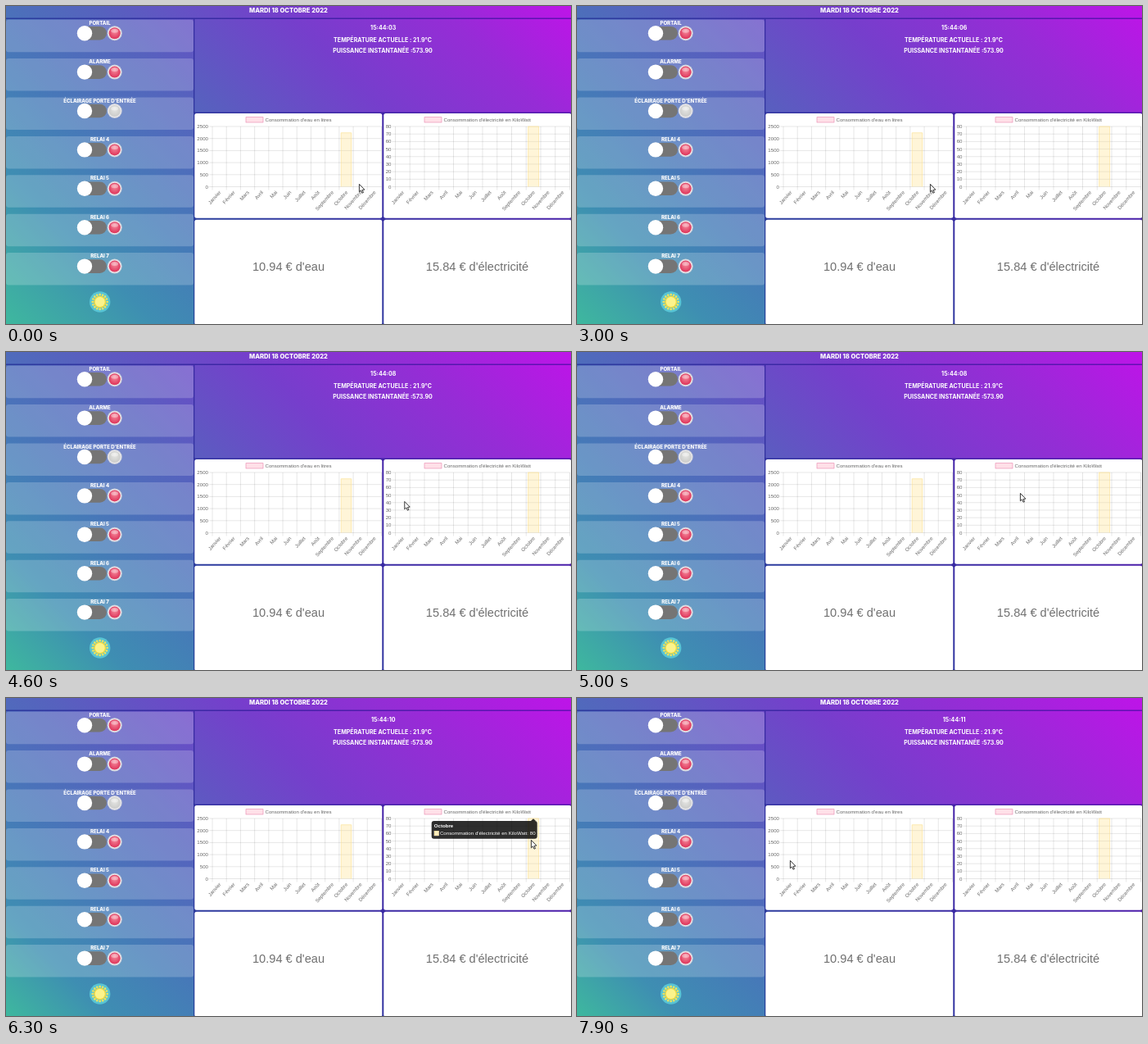
Write an HTML page with a canvas that moves like this. It is 690 by 388 pixels and loops after 8000 ms.

```html
<!DOCTYPE html>
<html lang="fr">
<head>
<meta charset="utf-8">
<style>
html, body { margin: 0; overflow: hidden; }
canvas { display: block; }
</style>
</head>
<body>
<canvas id="stage" width="690" height="388"></canvas>
<script>
const ctx = document.getElementById('stage').getContext('2d');
const LOOP = 8000, STEP = 100;
const SANS = '"Liberation Sans", Arial, sans-serif';
const INTER = 'Inter, sans-serif';
const MONTHS = ['Janvier', 'Février', 'Mars', 'Avril', 'Mai', 'Juin', 'Juillet',
  'Août', 'Septembre', 'Octobre', 'Novembre', 'Décembre'];
const RELAYS = ['PORTAIL', 'ALARME', "ÉCLAIRAGE PORTE D'ENTRÉE", 'RELAI 4', 'RELAI 5', 'RELAI 6', 'RELAI 7'];
const WATER = { name: "Consommation d'eau en litres", legend: 293, left: 252, right: 458.5, max: 2500, tick: 500, value: 2236.61 };
const POWER = { name: "Consommation d'électricité en KiloWatt", legend: 511, left: 475.5, right: 688.5, max: 80, tick: 10, value: 80 };
const TOP = 147, BASE = 220.5;

// time, x, y
const PATH = [
  [0, 431, 217], [3000, 431, 217], [3400, 410, 196], [4100, 410, 196],
  [5000, 541, 172], [5400, 600, 200], [5800, 641, 173], [6400, 641, 173],
  [6600, 637, 177], [6700, 637, 177], [7200, 540, 207], [7600, 350, 198],
  [7900, 260, 198], [LOOP, 260, 198]
];

const clamp = v => Math.max(0, Math.min(1, v));
const smooth = v => v * v * (3 - 2 * v);
const fade = (t, start, end) => clamp((t - start) / 300) * clamp((end - t) / 300);

function cursorAt(t) {
  const i = PATH.findIndex(p => p[0] > t);
  const [a, b] = [PATH[i - 1], PATH[i]];
  const k = smooth((t - a[0]) / (b[0] - a[0]));
  return [a[1] + (b[1] - a[1]) * k, a[2] + (b[2] - a[2]) * k];
}

function text(str, x, y, font, color, align = 'center') {
  ctx.font = font;
  ctx.fillStyle = color;
  ctx.textAlign = align;
  ctx.textBaseline = 'alphabetic';
  ctx.fillText(str, x, y);
}

function box(x, y, w, h, r, fill) {
  ctx.beginPath();
  ctx.roundRect(x, y, w, h, r);
  ctx.fillStyle = fill;
  ctx.fill();
}

function disc(x, y, r, fill) {
  ctx.beginPath();
  ctx.arc(x, y, r, 0, 2 * Math.PI);
  ctx.fillStyle = fill;
  ctx.fill();
}

function polygon(points, fill) {
  ctx.beginPath();
  points.forEach(p => ctx.lineTo(...p));
  ctx.closePath();
  ctx.fillStyle = fill;
  ctx.fill();
}

function background(t) {
  const shift = [3000, 4200, 6000].filter(s => t >= s).length * 0.018;
  const g = ctx.createLinearGradient(75.5, 463.5, 614.5, -75.5);
  [[0, '#3eb89e'], [.17, '#3e8eb2'], [.3, '#4679b8'], [.46, '#5662be'],
   [.67, '#763ecc'], [.85, '#962cd6'], [1, '#be14e8']]
    .forEach(([at, color]) => g.addColorStop(at === 0 || at === 1 ? at : at - shift, color));
  ctx.fillStyle = g;
  ctx.fillRect(0, 0, 690, 388);
  ctx.fillStyle = 'rgba(10,10,130,.5)';
  ctx.fillRect(0, 14.5, 690, 1.5);
  ctx.fillRect(229, 16, 1.3, 114);
  ctx.fillRect(229, 129.5, 461, 259);
}

function led(x, y, on) {
  disc(x, y, 9, '#cfd2da');
  disc(x, y, 8, '#eceaee');
  const g = ctx.createRadialGradient(x, y - 3, 1, x, y, 7.5);
  g.addColorStop(0, on ? '#f58a9c' : '#e6e6e4');
  g.addColorStop(1, on ? '#dc2f56' : '#c9cac8');
  disc(x, y, 7, g);
  ctx.fillStyle = 'rgba(255,255,255,.35)';
  ctx.beginPath();
  ctx.ellipse(x, y - 3, 4.5, 2.5, 0, 0, 2 * Math.PI);
  ctx.fill();
}

function relay(name, i) {
  const y = 33.2 + i * 47.4;
  box(0, y - 16.5, 229, 39.5, 3, 'rgba(255,255,255,.2)');
  text(name, 114.5, y - 10.4, '800 6.1px ' + INTER, '#fff');
  box(88, y - 8.3, 35, 16.6, 8.3, '#757575');
  disc(96, y, 9.2, '#fff');
  led(132.7, y, i !== 2);
}

function sun(x, y) {
  disc(x, y, 12.7, '#58c4d4');
  for (let i = 0; i < 16; i++) {
    const a = i * Math.PI / 8;
    disc(x + 9 * Math.cos(a), y + 9 * Math.sin(a), 1.3, '#f3e45c');
  }
  disc(x, y, 7.6, '#f0d943');
  disc(x, y, 6, '#fbf38c');
}

function chart({ name, legend, left, right, max, tick, value }) {
  const slot = (right - left) / 12;
  const font = '6.15px ' + SANS;
  ctx.lineWidth = .6;
  ctx.fillStyle = '#ffe0e8';
  ctx.strokeStyle = '#e884ac';
  ctx.fillRect(legend, 135.7, 21, 6.3);
  ctx.strokeRect(legend, 135.7, 21, 6.3);
  text(name, legend + 23.5, 141, font, '#666', 'left');

  ctx.strokeStyle = 'rgba(0,0,0,.17)';
  ctx.beginPath();
  for (let v = 0; v <= max; v += tick) {
    const y = BASE - v / max * (BASE - TOP);
    ctx.moveTo(left - 4, y);
    ctx.lineTo(right, y);
    text(v, left - 5, y + 2, font, '#666', 'right');
  }
  for (let i = 0; i <= 12; i++) {
    ctx.moveTo(left + i * slot, TOP);
    ctx.lineTo(left + i * slot, BASE + 4);
  }
  ctx.stroke();

  MONTHS.forEach((month, i) => {
    ctx.save();
    ctx.translate(left + (i + .5) * slot + 1.5, 227);
    ctx.rotate(-.84);
    text(month, 0, 1, font, '#666', 'right');
    ctx.restore();
  });

  const h = value / max * (BASE - TOP), w = slot * .73;
  const x = left + 9.5 * slot - w / 2;
  ctx.fillStyle = 'rgba(255,215,100,.25)';
  ctx.fillRect(x, BASE - h, w, h);
  ctx.strokeStyle = '#fbdf8a';
  ctx.beginPath();
  ctx.moveTo(x, BASE);
  ctx.lineTo(x, BASE - h);
  ctx.lineTo(x + w, BASE - h);
  ctx.lineTo(x + w, BASE);
  ctx.stroke();
}

function tooltip({ name, value }, x, y, w, caret, alpha) {
  if (!alpha) return;
  ctx.globalAlpha = alpha;
  const dark = 'rgba(0,0,0,.82)';
  box(x, y, w, 21.7, 3, dark);
  polygon(caret, dark);
  text('Octobre', x + 3, y + 8, 'bold 6.15px ' + SANS, '#fff', 'left');
  ctx.fillStyle = '#fff';
  ctx.fillRect(x + 3, y + 12, 6, 6.2);
  ctx.fillStyle = '#fff0c4';
  ctx.strokeStyle = '#f5d27a';
  ctx.fillRect(x + 3.6, y + 12.6, 4.8, 5);
  ctx.strokeRect(x + 3.6, y + 12.6, 4.8, 5);
  text(name + ': ' + value, x + 10.2, y + 17.3, '6.15px ' + SANS, '#fff', 'left');
  ctx.globalAlpha = 1;
}

function cursor(x, y) {
  polygon([[0, 0], [0, 9.4], [2.1, 7.5], [3.6, 10.8], [5.1, 10.1], [3.7, 7], [6.5, 6.7]]
    .map(([dx, dy]) => [x + .4 + dx, y + .4 + dy]), '#fff');
  ctx.lineWidth = .9;
  ctx.strokeStyle = '#222';
  ctx.stroke();
}

function draw(t) {
  background(t);
  text('MARDI 18 OCTOBRE 2022', 345, 7.8, '800 7.6px ' + INTER, '#fff');
  RELAYS.forEach(relay);
  sun(114.7, 361);

  // The dark overlay below the top panel shows through as card gutters.
  const seconds = String(3 + Math.floor((t + 700) / 1000)).padStart(2, '0');
  const bold = '700 7.1px ' + INTER;
  text('15:44:' + seconds, 460.7, 28.5, bold, '#fff');
  text('TEMPÉRATURE ACTUELLE : 21.9°C', 460, 44, bold, '#fff');
  text('PUISSANCE INSTANTANÉE :573.90', 460, 57.2, bold, '#fff');

  for (const x of [230.3, 461.3])
    for (const y of [131, 260.8]) box(x, y, 229, y < 200 ? 127.8 : 128, 2.5, '#fff');
  chart(WATER);
  chart(POWER);
  text("10.94 € d'eau", 345, 323.3, '14.6px ' + SANS, '#707070');
  text("15.84 € d'électricité", 575.5, 323.3, '14.6px ' + SANS, '#707070');

  tooltip(WATER, 293, 144, 118, [[411, 152], [414.5, 155], [411, 158]], fade(t, 3200, 4600));
  tooltip(POWER, 519.7, 150, 129, [[641, 150], [644, 147.2], [647, 150]], fade(t, 5500, 7200));
  cursor(...cursorAt(t));
}

function tick(now) {
  draw(Math.floor(now % LOOP / STEP) * STEP);
  requestAnimationFrame(tick);
}
requestAnimationFrame(tick);
</script>
</body>
</html>
```
